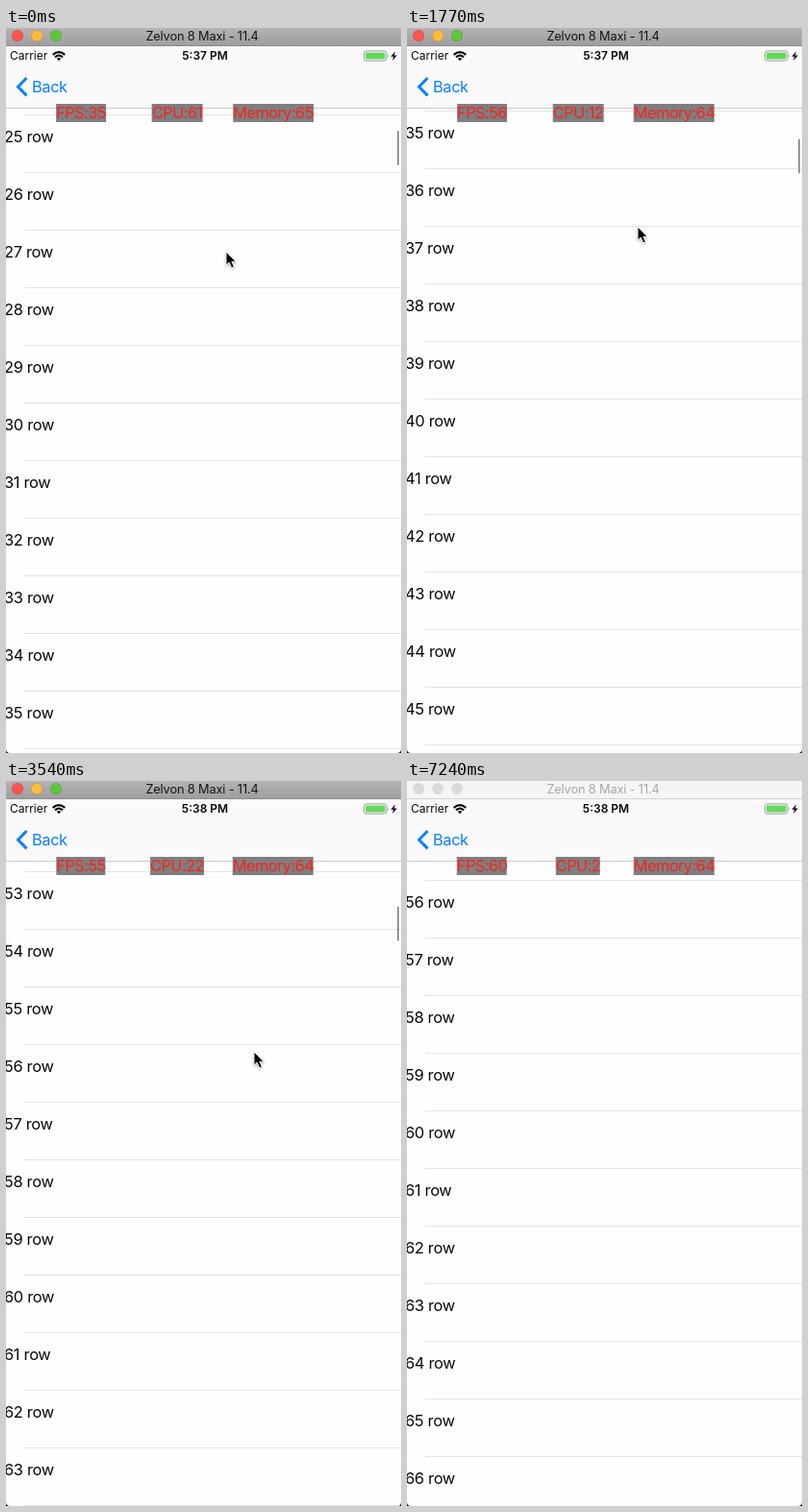
An HTML page that plays this animation: 411 px wide and 755 px high, repeating every 7260 ms.

```html
<!DOCTYPE html>
<html lang="en">
<head>
<meta charset="utf-8">
<title>List scrolling</title>
<style>
html, body { margin: 0; width: 100%; height: 100%; overflow: hidden; background: #000; }
#stage {
  position: relative; width: 411px; height: 755px; overflow: hidden;
  background: #fefefe; border-radius: 0 0 4px 4px;
  font: 16.4px/20px Inter, "Open Sans", sans-serif; letter-spacing: -.58px; color: #080808;
  white-space: pre;
}
#stage div, #stage span, #stage svg { position: absolute; }
#titlebar {
  inset: 0 0 auto; height: 18px; border-bottom: 1px solid #8d8a8d;
  background: linear-gradient(#b5b2b5, #a09da0); color: #141214;
  font-size: 12.8px; line-height: 17px; letter-spacing: -.15px; text-align: center; text-indent: -3px;
}
#titlebar i { position: absolute; top: 2px; width: 12px; height: 12px; border-radius: 50%; box-shadow: inset 0 0 0 .5px #0003; }
#titlebar.idle { background: #f5f5f5; border-color: #d2d2d2; color: #a9a9a9; }
#titlebar.idle i { background: #dadada !important; box-shadow: none; }
#status { inset: 19px 0 auto; height: 21px; font-size: 12px; letter-spacing: 0; }
#clock { left: 157px; width: 100px; text-align: center; font-weight: 600; }
#nav { inset: 19px 0 auto; height: 64px; background: #fafafa; border-bottom: 1px solid #cbcbcd; }
#icons { left: 0; top: 0; }
#back { left: 27px; top: 51px; color: #0a7fff; letter-spacing: -.4px; }
#list { inset: 84px 0 0; overflow: hidden; }
.row { left: 0; width: 411px; height: 60px; letter-spacing: -.3px; }
.row span { left: -2px; top: 13px; }
.row::after { content: ""; position: absolute; left: 19px; right: 0; top: 60px; height: 1px; background: #e4e4e6; }
#bar { left: 407px; top: 0; width: 2px; height: 36px; border-radius: 1px; background: #969696; }
.stat { top: 79px; line-height: 19px; background: #7f7f7f; color: #f8231f; transform: translateX(-50%); }
#cursor { left: -1px; top: -1px; filter: drop-shadow(0 1px 1px #0005); }
</style>
</head>
<body>
<div id="stage">
  <div id="list"></div>
  <div id="nav"></div>
  <div id="titlebar"><i style="left:6px;background:#fc5652"></i><i style="left:26px;background:#fdbb3d"></i><i style="left:46px;background:#5fc63c"></i>Zelvon 8 Maxi - 11.4</div>
  <div id="status"><span style="left:4px">Carrier</span><span id="clock"></span></div>
  <svg id="icons" width="411" height="84" fill="none">
    <g stroke="#080808" stroke-width="2.1">
      <path d="M48.7 27.9Q55 22.3 61.3 27.9M51 30.4Q55 26.8 59 30.4"/>
      <path d="M55 34.2l-2.2-2.4Q55 30 57.2 31.8z" fill="#080808" stroke="none"/>
    </g>
    <rect x="372.5" y="23.9" width="23.5" height="10.2" rx="2.4" stroke="#999"/>
    <rect x="374" y="25.4" width="20.5" height="7.2" rx="1" fill="#65d860"/>
    <path d="M397.3 27.2q1.8 1.8 0 3.6z" fill="#999"/>
    <path d="M405 24.2l-4.6 5.5h2.8l-1.2 4.4 4.9-5.7h-3z" fill="#080808"/>
    <path d="M21.5 52l-9 9.2 9 9.2" stroke="#0a7fff" stroke-width="3"/>
  </svg>
  <div id="back">Back</div>
  <div id="bar"></div>
  <div class="stat" style="left:78px"></div>
  <div class="stat" style="left:178px"></div>
  <div class="stat" style="left:278px"></div>
  <svg id="cursor" width="14" height="20" viewBox="-1 -1 14 20">
    <path d="M0 0V14.2l3.2-3 2.5 5.7 2.7-1.2-2.5-5.4h4.4z" stroke="#fff" stroke-width="1"/>
  </svg>
</div>
<script>
const LOOP = 7260, STEP = 147.6, ROW = 60, LIST_TOP = 84;
const $ = id => document.getElementById(id);
const stats = [...document.querySelectorAll('.stat')];

// One entry per half second; the last value holds.
const fps = [35, 33, 32, 44, 56, 51, 43, 55, 58, 60];
const cpu = [61, 50, 39, 24, 12, 38, 45, 22, 17, 11, 6, 3, 5, 3, 1, 2];
const memory = [65, 65, 64, 64, 64, 65, 65, 64];

// Pointer path: step, x, y
const path = [
  [0, 229, 233], [5, 212, 357], [9, 214, 362], [11, 228, 270], [12, 240, 207], [13, 242, 203],
  [16, 239, 337], [17.5, 240, 350], [19, 262, 220], [21, 260, 215], [24, 258, 282], [29, 258, 290],
  [31, 258, 290], [32, 226, 253], [34, 226, 253], [41, 302, 634], [42, 328, 738]
];

const rows = Array.from({ length: 13 }, () => {
  const row = document.createElement('div');
  row.className = 'row';
  row.append(document.createElement('span'));
  $('list').append(row);
  return row;
});

const glide = (from, to, k) => to - (to - from) * Math.exp(-k / 3.41);

// Three flicks, each slowing down until the next touch.
function offset(k) {
  if (k < 12) return glide(1350, 1952, k);
  if (k < 19) return glide(1954, 2367, k - 12);
  return 3197 - 797 * (Math.max(0, 29 - k) / 10) ** 2.22;
}

function pointer(k) {
  const i = path.findIndex(p => p[0] > k);
  if (i < 0) return path[path.length - 1].slice(1);
  const [a, b] = [path[i - 1], path[i]];
  const u = (k - a[0]) / (b[0] - a[0]);
  return [1, 2].map(n => Math.round(a[n] + (b[n] - a[n]) * u));
}

const at = (list, i) => list[Math.min(i, list.length - 1)];

function draw(k) {
  const scroll = Math.round(offset(k));
  const first = Math.floor((scroll + LIST_TOP) / ROW) + 1;
  rows.forEach((row, i) => {
    const n = first + i;
    row.firstChild.textContent = n + ' row';
    row.style.transform = `translateY(${(n - 1) * ROW - scroll - LIST_TOP}px)`;
  });

  $('bar').style.transform = `translateY(${107 + (scroll - 1350) * .0141}px)`;
  $('bar').style.opacity = k < 33 ? 1 : 0;

  const tick = Math.floor((k + 1.7) / 3.333);
  stats[0].textContent = 'FPS:' + at(fps, tick);
  stats[1].textContent = 'CPU:' + at(cpu, tick);
  stats[2].textContent = 'Memory:' + at(memory, tick);

  $('clock').textContent = k < 20 ? '5:37 PM' : '5:38 PM';
  $('titlebar').className = k < 49 ? '' : 'idle';

  const [x, y] = pointer(k);
  $('cursor').style.transform = `translate(${x}px, ${y}px)`;
  $('cursor').style.opacity = k < 43 ? 1 : 0;
}

const start = performance.now();
let shown = -1;
function frame() {
  const t = (performance.now() - start) % LOOP;
  const k = Math.min(49, Math.floor((t + 12) / STEP));
  if (k !== shown) draw(shown = k);
  requestAnimationFrame(frame);
}
frame();
</script>
</body>
</html>
```
